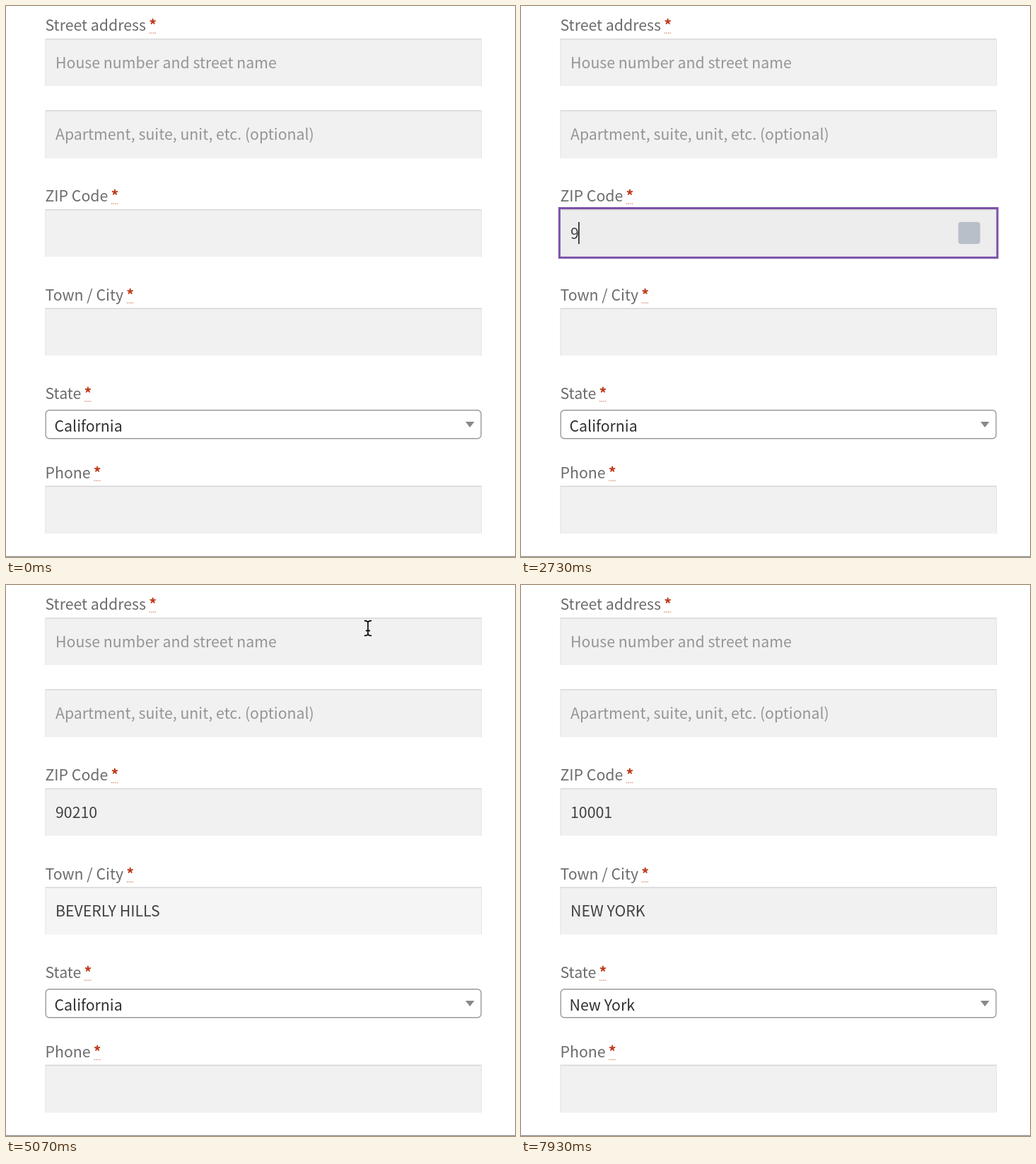
An HTML page with a canvas for the animation above (8000 ms loop, 720 px wide and 778 px high).

```html
<!DOCTYPE html>
<html lang="en">
<head>
<meta charset="utf-8">
<title>Address form</title>
<style>
html, body { margin: 0; width: 100%; height: 100%; overflow: hidden; background: #fff; }
canvas { display: block; width: 720px; height: 778px; }
</style>
</head>
<body>
<canvas id="stage" width="720" height="778"></canvas>
<script>
const ctx = document.getElementById('stage').getContext('2d');
const LOOP = 8000;
const FAMILY = '"Noto Sans CJK JP", "Noto Sans CJK SC", "Noto Sans CJK", "Open Sans", sans-serif';
const FONT = '21.3px ' + FAMILY;
const BOLD = 'bold 21.3px ' + FAMILY;
const INK = '#404144';

// Cursor paths: [ms, x, y]
const PATHS = [
  [[270, 311, 262], [330, 336, 324], [600, 336, 324], [1130, 71, 322], [1200, 76, 322],
   [1730, 76, 322], [2000, 520, -16]],
  [[5070, 512, 61], [5470, 335, 262], [5670, 284, 338], [5870, 289, 321], [6600, 289, 321]]
];

// Typed values: [ms, text]
const ZIP = [[0, ''], [2470, '9'], [2800, '90'], [3000, '902'], [3330, '9021'], [3600, '90210'],
  [6670, '1'], [6800, '10'], [6930, '100'], [7070, '1000'], [7200, '10001']];
const TOWN = [[0, ''], [4330, 'BEVERLY HILLS'], [7930, 'NEW YORK']];
const STATE = [[0, 'California'], [7930, 'New York']];
const LOADS = [[3930, 4330], [7670, 7930]];

const within = (t, a, b) => t >= a && t < b;
const smooth = p => p * p * (3 - 2 * p);
const valueAt = (list, t) => list.filter(e => e[0] <= t).pop()[1];

function rect(x, y, w, h, color) {
  ctx.fillStyle = color;
  ctx.fillRect(x, y, w, h);
}

function text(s, x, y, color, font = FONT) {
  ctx.font = font;
  ctx.fillStyle = color;
  ctx.fillText(s, x, y);
  return ctx.measureText(s).width;
}

function label(s, y) {
  const x = 55.5 + text(s + ' ', 55.5, y, '#6b6b6b');
  text('*', x - 0.5, y, '#c0391b', BOLD);
  for (let i = 0; i < 4; i++) rect(x + i * 2.6, y + 2.5, 1.3, 1.3, '#cf7a66');
}

function input(y, h, o = {}) {
  rect(55.5, y, 617.5, h, o.focus ? '#ededed' : o.fill || '#f1f1f1');
  if (o.valid) {
    rect(55.5, y, 3.5, h, '#0f834d');
  } else {
    rect(55.5, y, 617.5, 1.5, '#d8d8d8');
    rect(55.5, y, 1, h, '#e4e4e4');
    rect(672, y, 1, h, '#e4e4e4');
  }
  if (o.focus) {
    ctx.strokeStyle = '#7a51a8';
    ctx.lineWidth = 3;
    ctx.strokeRect(54.3, y - 1.5, 619.6, h + 2.8);
  }
  const mid = y + h / 2;
  if (o.value) {
    ctx.font = FONT;
    if (o.selected) rect(70, mid - 15.5, ctx.measureText(o.value).width, 31, '#a8cdf3');
    text(o.value, 70, mid + 8.3, INK);
  } else if (o.hint) {
    text(o.hint, 70, mid + 8.3, '#959595');
  }
  if (o.caret) {
    ctx.font = FONT;
    rect(69.3 + ctx.measureText(o.value || '').width, mid - 15.5, 1.5, 31, '#111');
  }
}

function badge(x, y) {
  ctx.fillStyle = '#b9bfc9';
  ctx.beginPath();
  ctx.roundRect(x, y, 31, 31, 4);
  ctx.fill();
}

function select(value) {
  ctx.strokeStyle = '#999';
  ctx.lineWidth = 1.4;
  ctx.beginPath();
  ctx.roundRect(56.2, 570.7, 615.8, 40, 5);
  ctx.stroke();
  text(value, 68.5, 601, '#303030');
  ctx.fillStyle = '#888';
  ctx.beginPath();
  ctx.moveTo(650, 587);
  ctx.lineTo(662.5, 587);
  ctx.lineTo(656.2, 595);
  ctx.fill();
}

function loader(age) {
  ctx.save();
  const p = Math.min(1, (age + 67) / 200);
  const fade = 0.5 - Math.cos(Math.PI * p) / 2;
  ctx.globalAlpha = 0.6 * fade;
  rect(0, 0, 720, 776, '#fff');
  ctx.translate(363, 251);
  ctx.rotate(smooth((age + 170) % 1000 / 1000) * 2 * Math.PI);
  ctx.fillStyle = '#808080';
  for (let i = 0; i < 7; i++) {
    const a = i * Math.PI / 4;
    ctx.beginPath();
    ctx.arc(17.5 * Math.cos(a), 17.5 * Math.sin(a), 4.2, 0, 7);
    ctx.fill();
  }
  ctx.restore();
}

function cursor(x, y) {
  ctx.save();
  ctx.translate(x, y);
  ctx.lineCap = 'round';
  for (const [color, width] of [['#fff', 4], ['#111', 1.8]]) {
    ctx.strokeStyle = color;
    ctx.lineWidth = width;
    ctx.beginPath();
    for (const s of [-1, 1]) {
      ctx.moveTo(-4.5, 10.5 * s);
      ctx.quadraticCurveTo(0, 10.5 * s, 0, 7.5 * s);
      ctx.quadraticCurveTo(0, 10.5 * s, 4.5, 10.5 * s);
    }
    ctx.moveTo(0, -8);
    ctx.lineTo(0, 8);
    ctx.moveTo(-2.5, 3.5);
    ctx.lineTo(2.5, 3.5);
    ctx.stroke();
  }
  ctx.restore();
}

function drawCursor(t) {
  for (const path of PATHS) {
    for (let i = 1; i < path.length; i++) {
      const [t0, x0, y0] = path[i - 1], [t1, x1, y1] = path[i];
      if (!within(t, t0, t1)) continue;
      const p = smooth((t - t0) / (t1 - t0));
      cursor(x0 + (x1 - x0) * p, y0 + (y1 - y0) * p);
    }
  }
}

function draw(t) {
  rect(0, 0, 720, 778, '#fff');
  const load = LOADS.find(([a, b]) => within(t, a, b));
  const zipFocus = within(t, 1400, 3930) || within(t, 5930, 7670);
  const selected = within(t, 6130, 6670);
  const town = valueAt(TOWN, t);

  label('Street address', 35);
  input(46, 67, { hint: 'House number and street name' });
  input(147, 68, { hint: 'Apartment, suite, unit, etc. (optional)' });
  label('ZIP Code', 276);
  input(287, 67, {
    value: valueAt(ZIP, t), focus: zipFocus, valid: load, selected,
    caret: zipFocus && !selected && !within(t, 1930, 2470)
  });
  label('Town / City', 416);
  input(426.5, 67, {
    value: town, focus: load, selected: load, caret: load && !town,
    fill: within(t, 4330, 7670) ? '#f5f5f5' : ''
  });
  label('State', 555);
  select(valueAt(STATE, t));
  label('Phone', 667);
  input(677.5, 67.5);
  rect(0, 776.8, 720, 1.2, '#8f8f8f');

  if (load) loader(t - load[0]);
  if (zipFocus) badge(618.5, 305);
  if (load) badge(16, 445);
  drawCursor(t);
}

function tick() {
  draw(performance.now() % LOOP);
  requestAnimationFrame(tick);
}
tick();
</script>
</body>
</html>
```
